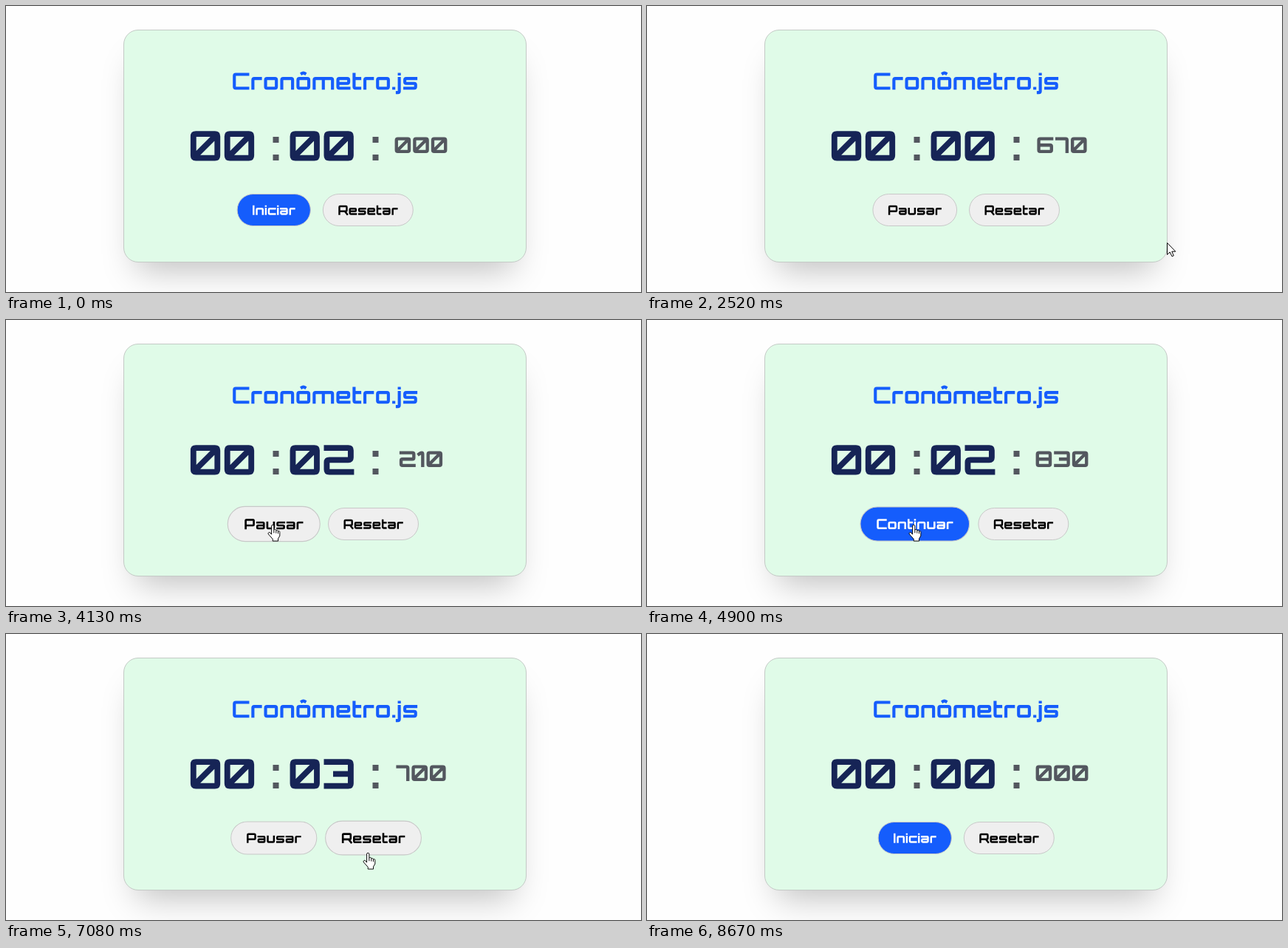
Animation, 860 px wide and 387 px high, one loop 9.86 s. Source, as an HTML page:

```html
<!DOCTYPE html>
<html lang="pt">
<head>
<meta charset="utf-8">
<title>Cronômetro.js</title>
<style>
html, body { margin: 0; width: 100%; height: 100%; overflow: hidden; background: #fefefe; font-family: Roboto, sans-serif; }
.card {
  position: absolute; left: 159px; top: 32px; width: 546px; height: 315px; box-sizing: border-box;
  border: 1px solid #c4cac6; border-radius: 20px; background: #e0fbe8;
  box-shadow: 0 28px 46px -18px rgba(0, 0, 0, .25);
}
svg { position: absolute; left: 0; top: 0; }
.ink { fill: none; stroke-linejoin: round; }
.title { stroke: #155dfc; }
.big { stroke: #162456; }
.small { stroke: #53575f; }
.colon { fill: #53575f; }
.button rect { fill: #efefef; stroke: #c8c8c8; }
.button path { stroke: #000; }
.button.blue rect { fill: #155dfc; }
.button.blue path { stroke: #fff; }
.cursor path { fill: #fff; stroke: #000; stroke-linejoin: round; }
.cursor .crease { fill: none; }
</style>
</head>
<body>
<div class="card"></div>
<svg width="860" height="387" viewBox="0 0 860 387">
  <path id="title" class="ink title" role="img"/>
  <path id="min" class="ink big" role="img"/>
  <path id="sec" class="ink big" role="img"/>
  <path id="ms" class="ink small" role="img"/>
  <path class="colon" d="M361.5 177h8v8h-8zm0 24h8v8h-8zM496.5 177h8v8h-8zm0 24h8v8h-8z"/>
  <g id="main" class="button"><rect y="-21.5" height="43" rx="21.5"/><path class="ink" role="img"/></g>
  <g id="reset" class="button"><rect y="-21.5" height="43" rx="21.5"/><path class="ink" role="img"/></g>
  <g id="cursor" class="cursor">
    <path id="arrow" d="M.5 .5V16.5L4.2 13 7 18.8 9.3 17.8 6.8 12.2H11.8Z"/>
    <g id="hand" transform="translate(-7.5 -.3) scale(.96)">
      <path d="M5.3 14V2.3a1.7 1.7 0 0 1 3.4 0V8a1.6 1.6 0 0 1 3.1 .4V9a1.5 1.5 0 0 1 2.8 .5v.7a1.3 1.3 0 0 1 2.4 1V16L14.6 20v3.3H7V20.5L1 13.8a1.6 1.6 0 0 1 2.5-2.1Z"/>
      <path class="crease" d="M8.7 8v4M11.8 9v3.4M14.6 10v3"/>
    </g>
  </g>
</svg>
<script>
const LOOP = 9860, STEP = 70, FADE = 200, PRESS = 160, RATE = .9565;
const $ = id => document.getElementById(id);
const clamp = (v, lo, hi) => Math.min(hi, Math.max(lo, v));

// Square lettering: each stroke joins lattice points, named by column and row.
const GLYPHS = {
  0: 'lt rt rb lb z,lb rt',
  1: 'LX ct rt rF',
  2: 'Lt rt rm lm lb Rb',
  3: 'Lt rt rb Lb,pm rm',
  4: 'qF qt ct lm ln Rn',
  5: 'Rt lt lm rm rb Lb',
  6: 'Rt lt lb rb rm lm',
  7: 'Lt rt rF',
  8: 'lt rt rb lb z,lm rm',
  9: 'Lb rb rt lt lm rm',
  C: 'Rt lt lb Rb',
  I: 'cT cF',
  P: 'lF lt rt rn ln',
  R: 'lF lt rt rn ln,qn RF',
  a: 'Lx rx rb lb ln rn',
  c: 'Rx lx lb Rb',
  e: 'Rb lb lx rx rn ln',
  i: 'cX cF,cT ci',
  j: 'cX cD oD,cT ci',
  m: 'lF lx rx rF,cx cF',
  n: 'lF lx rx rF',
  o: 'lx rx rb lb z',
  'ô': 'lx rx rb lb z,pk ch qk',
  r: 'lF lx Rx',
  s: 'Rx lx ln rn rb Lb',
  t: 'lT lb Rb,lx Rx',
  u: 'lX lb rb rX',
  '.': 'cs cF'
};
const SPECIAL = { 1: 40, 4: 76, 7: 70, I: 24, i: 22, j: 24, m: 101, r: 54, t: 46, '.': 23 };

// Advances are in hundredths of the font size.
const advance = ch => SPECIAL[ch] || (/\d/.test(ch) ? 82 : /[A-Z]/.test(ch) ? 79 : 69);
const measure = text => [...text].reduce((sum, ch) => sum + advance(ch), 0);

function lattice(width, weight) {
  const h = weight / 2;
  const cols = { o: -3, L: 5, l: 5 + h, p: width / 3, c: width / 2, q: width * 2 / 3, r: width - 5 - h, R: width - 4 };
  const rows = { h: -1, T: 0, t: h, k: 6, i: 11, X: 18, x: 18 + h, m: 36, n: 45, s: 60, b: 72 - h, F: 72, D: 84 };
  return key => [cols[key[0]], rows[key[1]]];
}

// Point on the way from p to q, at most r units along or half the way.
function toward(p, q, r) {
  const k = Math.min(r / Math.hypot(q[0] - p[0], q[1] - p[1]), .5);
  return [p[0] + (q[0] - p[0]) * k, p[1] + (q[1] - p[1]) * k];
}

function rounded(pts, closed, place) {
  const n = pts.length;
  return pts.map((p, i) => {
    const cmd = i ? 'L' : 'M';
    if (!closed && (i === 0 || i === n - 1)) return cmd + place(p);
    const before = toward(p, pts[(i + n - 1) % n], 6), after = toward(p, pts[(i + 1) % n], 6);
    return `${cmd}${place(before)}Q${place(p)} ${place(after)}`;
  }).join('') + (closed ? 'Z' : '');
}

function letter(el, text, cx, top, size, weight) {
  if (el.getAttribute('aria-label') === text) return;
  const u = size / 100;
  let x = cx - measure(text) * u / 2, d = '';
  for (const ch of text) {
    const point = lattice(advance(ch), weight);
    const place = p => `${(x + p[0] * u).toFixed(2)} ${(top + p[1] * u).toFixed(2)}`;
    for (const line of GLYPHS[ch].split(',')) {
      const keys = line.split(' '), closed = keys.includes('z');
      d += rounded(keys.filter(k => k !== 'z').map(point), closed, place);
    }
    x += advance(ch) * u;
  }
  el.setAttribute('aria-label', text);
  el.setAttribute('d', d);
  el.setAttribute('stroke-width', weight * u);
}

// Pointer stops: time, x, y.
const PATH = [
  [380, 546, 362], [1080, 386, 285], [2200, 386, 285], [2520, 704, 320], [2660, 715, 335],
  [2800, 763, 316], [3080, 668, 346], [3710, 234, 281], [4060, 362, 277], [6860, 362, 277],
  [7040, 491, 296], [8360, 491, 296], [8620, 640, 348]
];
const MAIN = { hovers: [[940, 2240], [3880, 6980]], clicks: [1810, 4820, 6155] };
const RESET = { hovers: [[7005, 8440]], clicks: [7860] };
const PICTURES = [0, 380, 1140, 1690, 2520, 6160, 7080, 8390];

// Every picture is held for one step.
function snap(t) {
  const start = PICTURES.filter(p => p <= t).pop();
  return start + Math.floor((t - start) / STEP) * STEP;
}

function pointer(t) {
  const i = clamp(PATH.findIndex(p => p[0] > t), 1, PATH.length - 1);
  const [t0, x0, y0] = PATH[i - 1], [t1, x1, y1] = PATH[i];
  const s = clamp((t - t0) / (t1 - t0), 0, 1), k = s * s * (3 - 2 * s);
  return [x0 + (x1 - x0) * k, y0 + (y1 - y0) * k].map(Math.round);
}

// A button grows while hovered and shrinks back while pressed.
function scale({ hovers, clicks }, t) {
  const since = start => 1 - (1 - clamp((t - start) / FADE, 0, 1)) ** 2.2;
  let level = 0;
  for (const [enter, leave] of hovers) level += since(enter) - since(leave);
  for (const up of clicks) level -= since(up - PRESS) - since(up);
  return 1 + level / 10;
}

const isReset = t => t >= RESET.clicks[0];

function elapsed(t) {
  if (isReset(t)) return 0;
  const running = clamp(t, 1819, 4778) - 1819 + Math.max(0, t - 6170);
  return Math.floor(running * RATE / 10) * 10;
}

function mainLabel(t) {
  const count = isReset(t) ? 0 : MAIN.clicks.filter(c => c <= t).length;
  return count === 0 ? 'Iniciar' : count % 2 ? 'Pausar' : 'Continuar';
}

const buttonWidth = text => measure(text) * .18 + 40;

function button(el, text, left, size) {
  const w = buttonWidth(text), [rect, ink] = el.children;
  rect.setAttribute('x', -w / 2);
  rect.setAttribute('width', w);
  letter(ink, text, 0, -6.3, 18, 13.5);
  el.setAttribute('transform', `translate(${left + w / 2} 276) scale(${size})`);
}

const pad = (n, len) => String(n).padStart(len, '0');
const show = (id, on) => { $(id).style.display = on ? '' : 'none'; };

function draw(t) {
  const ms = elapsed(t);
  letter($('sec'), pad(Math.floor(ms / 1000), 2), 427.7, 169.2, 56, 14);
  letter($('ms'), pad(ms % 1000, 3), 562, 177.4, 30, 14.5);

  const label = mainLabel(t), w = buttonWidth(label), gap = 17;
  const left = 432.2 - (w + gap + buttonWidth('Resetar')) / 2;
  $('main').classList.toggle('blue', label !== 'Pausar');
  button($('main'), label, left, scale(MAIN, t));
  button($('reset'), 'Resetar', left + w + gap, scale(RESET, t));

  const pointing = [...MAIN.hovers, ...RESET.hovers].some(([a, b]) => t >= a && t < b);
  const [x, y] = pointer(t);
  $('cursor').setAttribute('transform', `translate(${x} ${y})`);
  show('cursor', t >= 380 && t < 8670);
  show('hand', pointing);
  show('arrow', !pointing);
}

letter($('title'), 'Cronômetro.js', 432, 90.4, 31.8, 13);
letter($('min'), '00', 293, 169.2, 56, 14);
let last = -1;
function tick() {
  const t = snap(performance.now() % LOOP);
  if (t !== last) draw(last = t);
  requestAnimationFrame(tick);
}
tick();
</script>
</body>
</html>
```
